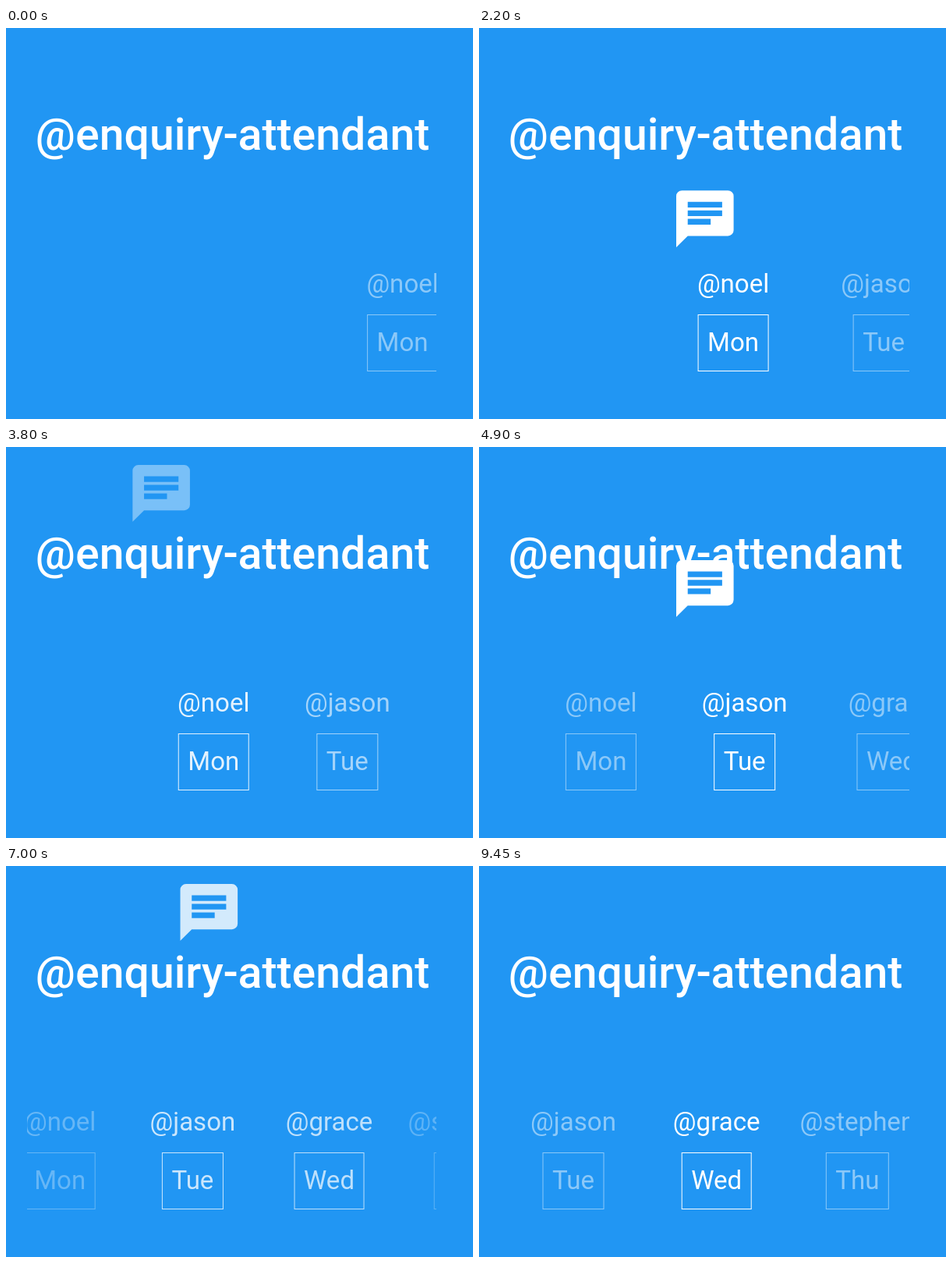
These frames come from a looping animation (599x501 px, 9500 ms). An HTML page:

```html
<!DOCTYPE html>
<html lang="en">
<head>
<meta charset="utf-8">
<style>
  html, body { margin: 0; width: 100%; height: 100%; overflow: hidden; background: #2196f3; }
  svg { display: block; width: 599px; height: 501px; }
  text { font-family: Roboto, sans-serif; font-size: 33.1px; text-anchor: middle; fill: #fff; }
  #title { font-size: 57.2px; font-weight: 500; }
  rect { fill: none; stroke: #fff; }
</style>
</head>
<body>
<svg viewBox="0 0 599 501">
  <defs>
    <clipPath id="lane"><path d="M27 300H552V460H27z"/></clipPath>
  </defs>
  <text id="title">@enquiry-attendant</text>
  <g id="days" clip-path="url(#lane)"></g>
  <path id="bubble" fill="#fff" fill-rule="evenodd"
    d="M2 0H18a2 2 0 0 1 2 2V14a2 2 0 0 1-2 2H4L0 20V2a2 2 0 0 1 2-2zM4 4V6H16V4zM4 7V9H16V7zM4 10V12H12V10z"/>
</svg>
<script>
const LOOP = 9500, STEP = 3000;
const $ = id => document.getElementById(id);
const clamp = v => Math.min(1, Math.max(0, v));
const smooth = v => (v = clamp(v), v * v * (3 - 2 * v));
const easeOut = v => 1 - (1 - clamp(v)) ** 2.5;
const between = (t, from, to) => (t - from) / (to - from);

// A day stops right of the lane, at its right, centre and left, then leaves.
const stops = [708, 508.5, 304.7, 121, -64];
const alphas = [0.1, 0.48, 1, 0.48, 0.1];
// When each move begins and ends within its step: the front days move last.
const begins = [60, 300, 550, 650];
const ends = [3160, 3500, 3350, 3500];

// Walks through the levels, one eased move per step.
function walk(levels, t, ease) {
  let value = levels[0];
  for (let i = 0; i < begins.length; i++) {
    value += (levels[i + 1] - levels[i]) * ease(t - (i - 1) * STEP, i);
  }
  return value;
}
const slide = (t, i) => easeOut(between(t, begins[i], ends[i]));
const fade = t => smooth(between(t, 400, 1700));

function add(parent, tag, attrs, label) {
  const el = document.createElementNS("http://www.w3.org/2000/svg", tag);
  for (const key in attrs) el.setAttribute(key, attrs[key]);
  if (label) el.textContent = label;
  return parent.appendChild(el);
}

function place(el, transform, opacity) {
  el.setAttribute("transform", transform);
  el.setAttribute("opacity", opacity);
}

const days = [
  ["@noel", "Mon", 90], ["@jason", "Tue", 78],
  ["@grace", "Wed", 89], ["@stephen", "Thu", 80]
].map(([name, day, width]) => {
  const g = add($("days"), "g", {});
  add(g, "text", { y: 339 }, name);
  add(g, "rect", { x: -width / 2, y: 367.5, width, height: 72 });
  add(g, "text", { y: 414 }, day);
  return g;
});

function draw(t) {
  days.forEach((g, i) => {
    const p = t - i * STEP;
    place(g, `translate(${walk(stops, p, slide)} 0)`, walk(alphas, p, fade));
  });

  // The bubble slides in above the title, then drops through it and fades.
  const p = t % STEP;
  const enter = smooth(between(p, 500, 1200));
  const drop = easeOut(between(p, 1560, 2810));
  const leave = smooth(between(p, 2250, 2700));
  const shown = t < 3 * STEP ? enter * (1 - leave) : 0;
  place($("bubble"), `translate(${103 + 150 * enter} ${23 + 222 * drop}) scale(3.68 3.64)`, shown);

  const pulse = Math.sin(Math.PI * clamp(between(p, 1000, 1800))) ** 2;
  const size = 1 + 0.03 * pulse;
  place($("title"), `translate(290.5 ${136 + 20 * size}) scale(${size})`, 1);
}

const start = performance.now();
function tick() {
  draw((performance.now() - start) % LOOP);
  requestAnimationFrame(tick);
}
draw(0);
requestAnimationFrame(tick);
</script>
</body>
</html>
```
